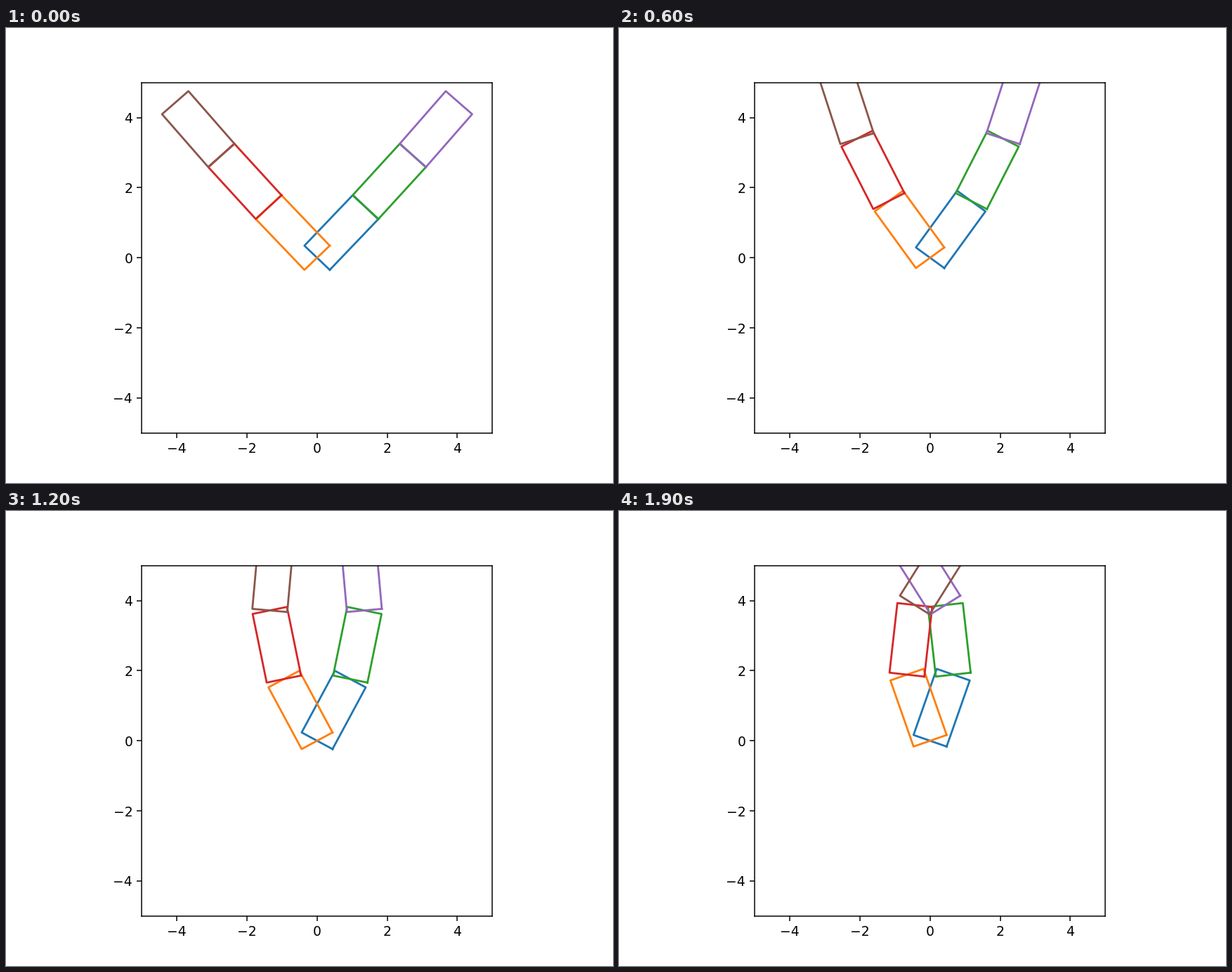
A matplotlib script that plays this animation: 864x648 px, repeating every 2000 ms.

```python
import numpy as np
import matplotlib.pyplot as plt
from matplotlib.animation import FuncAnimation

FRAMES = 20
STEP = np.pi / 140
LENGTH, WIDTH = 2, 1

# Outline of one link: its joint is at the origin, its axis points along x.
LINK = np.array([[0, LENGTH, LENGTH, 0, 0],
                 np.array([-1, -1, 1, 1, -1]) * WIDTH / 2])

fig, ax = plt.subplots(figsize=(6.4, 4.8), dpi=135)
ax.set_xlim(-5, 5)
ax.set_ylim(-5, 5)
ax.set_aspect("equal")

# Right and left links alternate, from the base to the tips.
lines = [ax.plot([], [], color=f"C{i}")[0] for i in range(6)]


def place(joint, angle):
    c, s = np.cos(angle), np.sin(angle)
    return np.array([[c, -s], [s, c]]) @ LINK + joint[:, None]


def draw_arm(arm, base, bend):
    joint = np.zeros(2)
    for n, line in enumerate(arm, start=1):
        angle = base + n * bend
        line.set_data(*place(joint, angle))
        joint = joint + LENGTH * np.array([np.cos(angle), np.sin(angle)])


def update(i):
    bend = STEP * (i + 1)
    draw_arm(lines[0::2], np.pi / 4, bend)
    draw_arm(lines[1::2], 3 * np.pi / 4, -bend)
    return lines


anim = FuncAnimation(fig, update, frames=FRAMES, interval=100,
                     repeat=True, repeat_delay=0)
plt.show()
```
